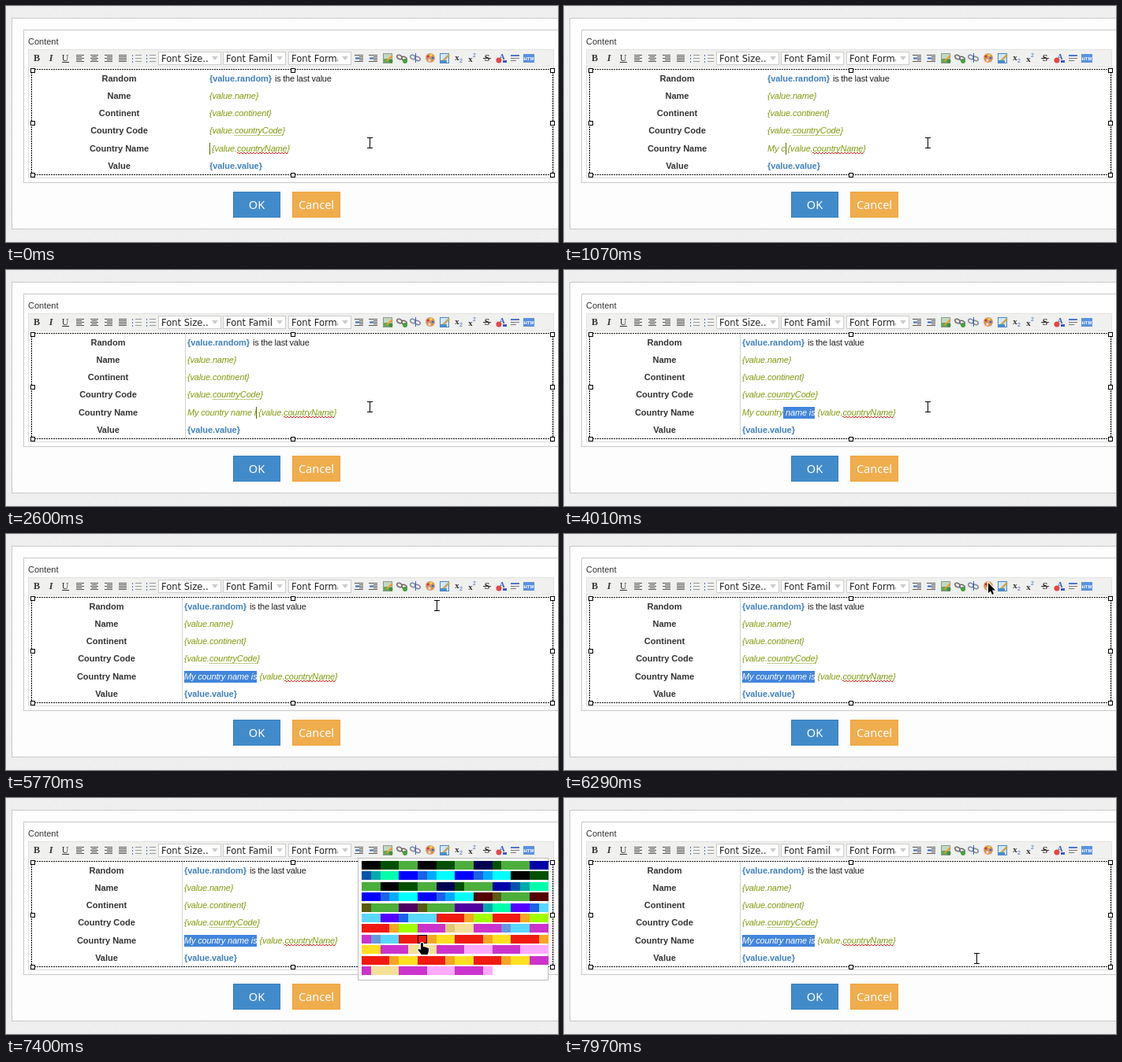
These frames come from a looping animation (700 by 300 pixels, 8000 ms). An HTML page with a canvas:

```html
<!DOCTYPE html>
<html>
<head>
<meta charset="utf-8">
<style>
  html, body { margin: 0; width: 700px; height: 300px; overflow: hidden; }
  canvas { display: block; }
</style>
</head>
<body>
<canvas id="stage" width="700" height="300"></canvas>
<script>
const LOOP = 8000;
const SANS = '"Liberation Sans", Arial, sans-serif';
const GREEN = '#809a0c', BLUE = '#4080c0', DARK = '#333', RED = '#e83020';
const stage = document.getElementById('stage');
const screen = stage.getContext('2d');
const backdrop = document.createElement('canvas');
backdrop.width = 700;
backdrop.height = 300;
let c = backdrop.getContext('2d');

function box(x, y, w, h, fill, border) {
  c.fillStyle = border || fill;
  c.fillRect(x, y, w, h);
  if (border) {
    c.fillStyle = fill;
    c.fillRect(x + 1, y + 1, w - 2, h - 2);
  }
}

function text(str, x, y, font, color, align = 'left', spacing = 0) {
  c.font = font;
  c.fillStyle = color;
  c.textAlign = align;
  c.letterSpacing = spacing + 'px';
  c.fillText(str, x, y);
}

function line(color, width, ...pts) {
  c.strokeStyle = color;
  c.lineWidth = width;
  c.beginPath();
  for (let i = 0; i < pts.length; i += 2) c.lineTo(pts[i], pts[i + 1]);
  c.stroke();
}

function dot(x, y, r, color) {
  c.fillStyle = color;
  c.beginPath();
  c.arc(x, y, r, 0, 7);
  c.fill();
}

// ---- static page ----

function drawSelect(x, label) {
  box(x, 58, 80, 17, '#fff', '#ccc');
  c.save();
  c.beginPath();
  c.rect(x, 58, 63, 17);
  c.clip();
  text(label, x + 4, 71, '11.5px "DejaVu Sans", sans-serif', '#222');
  c.restore();
  c.fillStyle = '#ccc';
  c.beginPath();
  c.moveTo(x + 68, 64);
  c.lineTo(x + 76, 64);
  c.lineTo(x + 72, 69);
  c.fill();
}

function drawBars(x, widths, align, color = '#555') {
  widths.forEach((w, i) => box(x + (10 - w) * align, 62 + i * 2, w, 1, color));
}

function drawToolbar() {
  box(28, 55, 667, 23, '#f0f0ee', '#e2e2e0');
  const serif = 'px "Liberation Serif", serif';
  text('B', 39, 70, 'bold 12' + serif, DARK, 'center');
  text('I', 57, 70, 'italic bold 12' + serif, DARK, 'center');
  text('U', 75, 70, '12' + serif, DARK, 'center');
  box(71, 71, 9, 1, DARK);
  [0, 0.5, 1, 0].forEach((align, i) =>
    drawBars(89 + i * 18, i < 3 ? [10, 7, 10, 7, 10] : [10, 10, 10, 10, 10], align));
  for (const x of [160, 178]) {
    for (const y of [62, 66, 70]) {
      box(x, y, 1, 2, '#4a78c8');
      box(x + 4, y, 8, 1, '#999');
    }
  }
  drawSelect(193, 'Font Size...');
  drawSelect(275, 'Font Family');
  drawSelect(358, 'Font Format');

  for (const x of [443, 461]) {
    drawBars(x, [11, 5, 5, 5, 11], 1);
    line('#3568c0', 2, x, 66.5, x + 5, 66.5);
  }
  // picture
  box(478, 60, 12, 13, '#c4d8c0', '#8a9a90');
  box(479, 67, 8, 5, '#68a850');
  line('#e0a030', 2, 483, 70, 490, 63);
  dot(488, 70, 2.5, '#3f8d3f');
  // link, unlink
  for (const x of [502, 519]) {
    c.strokeStyle = x < 510 ? '#666' : '#7a86a8';
    c.lineWidth = 1.5;
    for (const d of [-3, 3]) {
      c.beginPath();
      c.ellipse(x + d, 66 + d / 3, 3.5, 2.5, 0.5, 0, 7);
      c.stroke();
    }
  }
  dot(506, 70, 3, '#4aa040');
  line('#4060a0', 1, 519.5, 60, 519.5, 72);
  // palette
  dot(538, 66, 6, '#d89860');
  dot(535, 64, 1.5, '#d03030');
  dot(539, 62.5, 1.5, '#f4e040');
  dot(541, 66, 1.5, '#4060d0');
  dot(537, 69, 1.5, '#f0f0ee');
  // edit
  box(550, 60, 12, 13, '#d4e8fa', '#4a88c8');
  line('#c8a850', 2.5, 554, 70, 562, 62);
  box(551, 69, 8, 3, '#4a90d0');

  const bold = 'bold 11' + serif;
  text('x', 572, 69, bold, DARK, 'center');
  text('2', 577, 72, '7px ' + SANS, '#3568c0', 'center');
  text('x', 589, 71, bold, DARK, 'center');
  text('2', 594, 65, '7px ' + SANS, '#3568c0', 'center');
  text('S', 610, 70, 'bold 12' + serif, DARK, 'center');
  box(605, 66, 10, 1, DARK);
  text('A', 629, 68, 'bold 10' + serif, '#3060c0', 'center');
  dot(625, 69, 3.5, '#e04848');
  box(630, 69, 5, 3, '#3060c0');
  box(640, 62, 11, 2, '#4a78c8');
  box(640, 66, 11, 1, '#777');
  box(640, 69, 7, 1, '#777');
  box(656, 61, 14, 11, '#5a92e0');
  text('HTM', 663, 69, 'bold 6px ' + SANS, '#fff', 'center');
}

function drawPage() {
  box(0, 0, 700, 300, '#efefef');
  let seed = 7;
  for (let i = 0; i < 6000; i++) {
    seed = seed * 16807 % 2147483647;
    box(seed % 700, Math.floor(seed / 700) % 300, 2, 1, i % 2 ? '#ebebeb' : '#f2f2f2');
  }
  box(7, 15, 720, 269, '#fdfdfd', '#c8c8c8');
  box(22, 30, 720, 195, '#fff', '#c8c8c8');
  text('Content', 28, 49, '11px ' + SANS, DARK);
  box(28, 77, 667, 142, '#fff', '#ddd');
  drawToolbar();
  box(288, 236, 60, 33, '#428bca', '#357ebd');
  box(363, 236, 61, 33, '#f0ad4e', '#eea236');
  const font = '14.5px "Noto Sans", "Open Sans", sans-serif';
  text('OK', 318, 258, font, '#fff', 'center');
  text('Cancel', 393.5, 258, font, '#fff', 'center');
}

// ---- table being edited ----

const PHRASE = 'My country name is';
const KEY_TIMES = [480, 790, 870, 1030, 1090, 1160, 1370, 1430, 1500, 1800, 1940,
  2140, 2230, 2320, 2420, 2510, 2600, 2700];
const ITALIC = 'italic 11px ' + SANS, TIGHT = -0.16;

function italicWidth(str) {
  c.font = ITALIC;
  c.letterSpacing = TIGHT + 'px';
  return c.measureText(str).width;
}

const typedWidth = n => italicWidth(PHRASE.slice(0, n));
const italic = (str, x, y, color = GREEN) => text(str, x, y, ITALIC, color, 'left', TIGHT);

function underline(x, y, word, color, wave) {
  const start = Math.round(x + italicWidth('{value.')), width = italicWidth(word);
  for (let d = 0; d < width; d += 2) box(start + d, y + wave * (d / 2 % 2), 1 + wave, 1, color);
}

function columnLeft(typed) {
  if (typed < 11) return 258;
  const grown = (typedWidth(typed) - typedWidth(11)) / (typedWidth(18) - typedWidth(11));
  return Math.floor(255 - 29 * grown);
}

function selectedCount(t) {
  if (t < 3340) return 0;
  if (t < 3810) return 1;
  if (t >= 4580) return 18;
  if (t >= 4350) return 17;
  const k = Math.min(10, Math.floor((t - 3810) / 40));
  return 2 + Math.floor(k + 0.04 * k * k);
}

function drawTable(t) {
  const typed = KEY_TIMES.filter(time => time <= t).length;
  const x = columnLeft(typed);
  const center = 143.5 - (258 - x) / 2;
  ['Random', 'Name', 'Continent', 'Country Code', 'Country Name', 'Value'].forEach((label, i) =>
    text(label, center, [96, 118, 140, 162, 185, 207][i], 'bold 11px ' + SANS, DARK, 'center'));
  if (typed >= 11) box(x - 3, 81, 1, 133, '#d0d0d0');

  const bold = 'bold 11px ' + SANS;
  text('{value.random}', x, 96, bold, BLUE, 'left', -0.08);
  text('is the last value', x + 83, 96, '11px ' + SANS, '#222', 'left', -0.25);
  italic('{value.name}', x, 118);
  italic('{value.continent}', x, 140);
  italic('{value.countryCode}', x, 162);
  underline(x, 164, 'countryCode', GREEN, 0);
  text('{value.value}', x, 207, bold, BLUE, 'left', -0.08);

  const caret = x + typedWidth(typed);
  italic(PHRASE.slice(0, typed), x, 185);
  italic('{value.countryName}', caret + 3, 185);
  underline(caret + 3, 186, 'countryName', RED, 1);

  const selected = selectedCount(t);
  if (selected) {
    const left = Math.round(x + typedWidth(18 - selected));
    c.save();
    c.beginPath();
    c.rect(left, 174, Math.round(caret) - left, 15);
    c.clip();
    box(0, 174, 700, 15, '#4286dc');
    italic(PHRASE, x, 185, '#fff');
    c.restore();
  } else {
    box(Math.round(caret), 174, 1, 15, '#566600');
  }
}

function drawResizeFrame() {
  c.setLineDash([2, 1]);
  line('#000', 1, 33, 80.5, 694, 80.5);
  line('#000', 1, 33, 214.5, 694, 214.5);
  line('#000', 1, 32.5, 81, 32.5, 214);
  line('#000', 1, 693.5, 81, 693.5, 214);
  c.setLineDash([]);
  for (const x of [31, 361, 690])
    for (const y of [79, 146, 212])
      if (x !== 361 || y !== 146) box(x, y, 6, 6, '#fff', '#000');
}

// ---- colour menu ----

const LEVELS = [0, 0, 58, 170, 255, 255];
const SWATCHES = ('000000 005000 4caf3c 000050 0000a8 0000ff 1a62e6 00aaff 00ffff 00ffaa 0055aa 00aaaa ' +
  '550000 5a5a10 500060 5000a0 5500ff 6699dd 5ad8ff f01a10 a0ff00 f5a623 ffe020 cc33cc e0c878 f5e098 ffaaff')
  .split(' ').map(hex => [0, 2, 4].map(i => parseInt(hex.slice(i, i + 2), 16)));

function swatchColor(index) {
  // six steps of red, blue and green, reduced to the nearest swatch
  const rgb = [Math.floor(index / 36), index % 6, Math.floor(index / 6) % 6].map(v => LEVELS[v]);
  const distance = s => s.reduce((sum, v, i) => sum + (v - rgb[i]) ** 2, 0);
  return `rgb(${SWATCHES.reduce((a, b) => distance(b) < distance(a) ? b : a)})`;
}

const menuColors = Array.from({ length: 214 }, (_, i) => swatchColor(i));

function drawMenu(t) {
  const [hx, hy] = cursorAt(t - 60);
  box(446, 76, 242, 156, '#fff', '#bbb');
  menuColors.forEach((color, i) => {
    const col = i % 20, row = Math.floor(i / 20);
    const x = Math.round(451 + col * 11.83), y = Math.round(80 + row * 13.4);
    const w = Math.round(451 + (col + 1) * 11.83) - x;
    const hovered = hx >= x && hx < x + w && hy >= y && hy < y + 13;
    box(x, y, w, 11, color, hovered ? '#000' : undefined);
  });
}

// ---- mouse ----

const PATH = [[5020, 461, 174], [5810, 547, 90], [6230, 538, 62], [6600, 538, 62],
  [6760, 539, 113], [6880, 537, 150], [7030, 535, 149], [7610, 524, 204], [7969, 523, 205], [7970, 523, 204]];

function cursorAt(t) {
  if (t <= PATH[0][0]) return PATH[0].slice(1);
  const next = PATH.findIndex(p => p[0] > t);
  if (next < 0) return PATH[PATH.length - 1].slice(1);
  const [t0, x0, y0] = PATH[next - 1], [t1, x1, y1] = PATH[next];
  let k = (t - t0) / (t1 - t0);
  if (next === 1) k = k * k * (3 - 2 * k);
  return [Math.round(x0 + (x1 - x0) * k), Math.round(y0 + (y1 - y0) * k)];
}

const HAND = new Path2D('M-2 1Q-.5 -.8 1 1V5L4 5.5 8 7V11L6.5 15H-1L-5.5 9.5Q-5 7 -2 9Z');
const ARROW = new Path2D('M0 0V13L3 10.5 5 15 7 14 5 9.5H9Z');

function drawCursor(t) {
  const [x, y] = cursorAt(t);
  if (t < 5850 || t >= 7790) {
    for (const [color, width] of [['#fff', 3], ['#000', 1]]) {
      line(color, width, x + 0.5, y - 6.5, x + 0.5, y + 6.5);
      line(color, width, x - 3, y - 6.5, x + 4, y - 6.5);
      line(color, width, x - 3, y + 6.5, x + 4, y + 6.5);
    }
    return;
  }
  const shape = y > 78 ? HAND : ARROW;
  c.save();
  c.translate(x, y);
  c.strokeStyle = '#fff';
  c.lineWidth = 2;
  c.stroke(shape);
  c.fillStyle = '#000';
  c.fill(shape);
  c.restore();
}

function render(now) {
  const t = now % LOOP;
  c.drawImage(backdrop, 0, 0);
  drawTable(t);
  drawResizeFrame();
  if (t >= 6400 && t < 7790) drawMenu(t);
  drawCursor(t);
}

drawPage();
c = screen;
const start = performance.now();
(function tick() {
  render(performance.now() - start);
  requestAnimationFrame(tick);
})();
</script>
</body>
</html>
```
